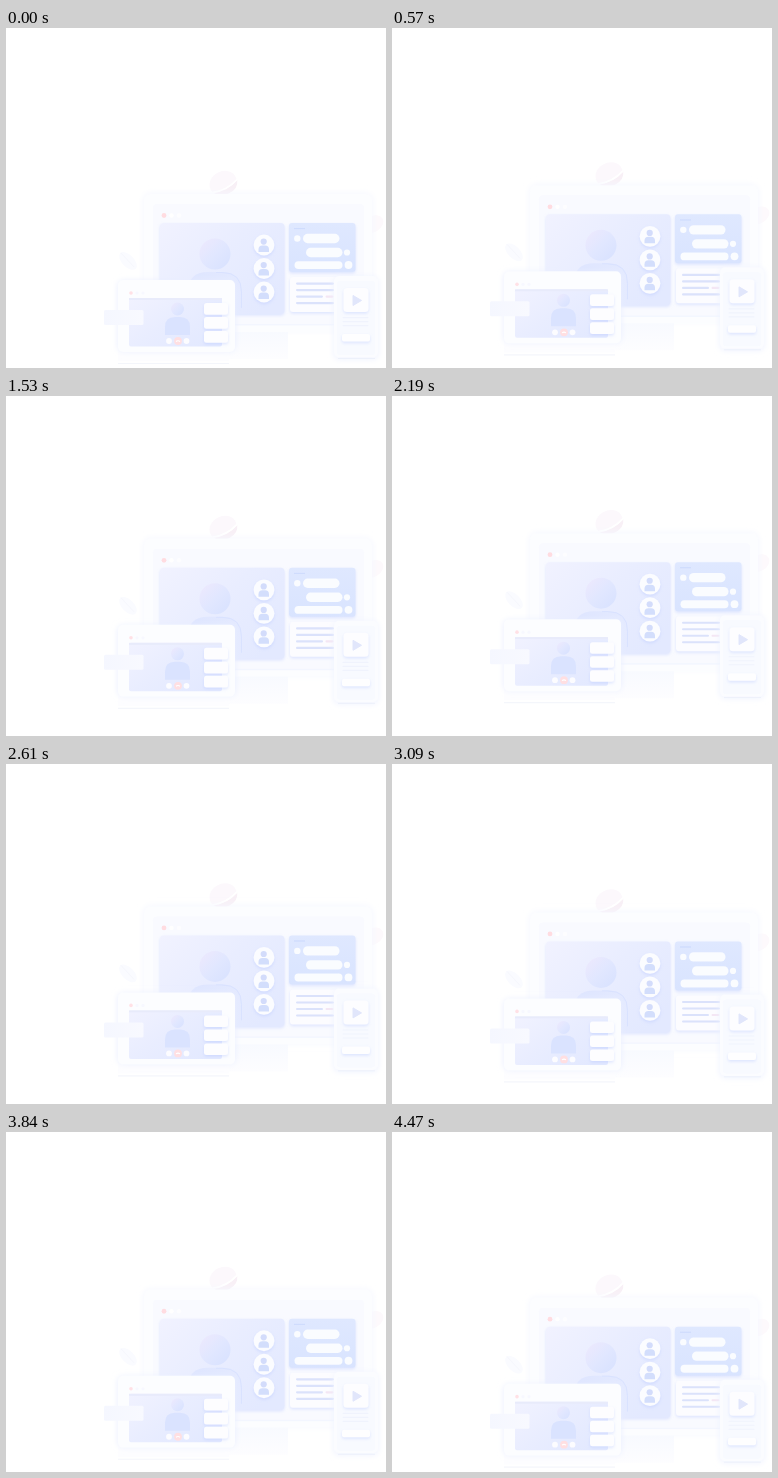
An HTML page for the animation above (4.5 s loop, 380 by 340 pixels).

```html
<!DOCTYPE html>
<html lang="en">
<head>
<meta charset="utf-8">
<title>Floating screens</title>
<style>
html, body { margin: 0; width: 100%; height: 100%; overflow: hidden; background: #fff; }
svg { display: block; width: 380px; height: 340px; }
</style>
</head>
<body>
<svg viewBox="0 0 380 340" xmlns="http://www.w3.org/2000/svg">
  <defs>
    <linearGradient id="call" x1="0" y1="0" x2="1" y2=".7">
      <stop offset="0" stop-color="#f1f2ff"/><stop offset=".5" stop-color="#e9edff"/><stop offset="1" stop-color="#e3e9ff"/>
    </linearGradient>
    <linearGradient id="chat" x1="0" y1="0" x2="0" y2="1">
      <stop offset="0" stop-color="#dfe8ff"/><stop offset="1" stop-color="#d9e4ff"/>
    </linearGradient>
    <linearGradient id="head" x1="0" y1="0" x2="1" y2="1">
      <stop offset="0" stop-color="#eee9fd"/><stop offset=".5" stop-color="#e1e7ff"/><stop offset="1" stop-color="#d7e1ff"/>
    </linearGradient>
    <linearGradient id="torso" x1="0" y1="0" x2="1" y2="0">
      <stop offset="0" stop-color="#dee5ff"/><stop offset="1" stop-color="#e4eaff"/>
    </linearGradient>
    <linearGradient id="tag" x1="0" y1="0" x2="1" y2="0">
      <stop offset="0" stop-color="#f5f7ff"/><stop offset="1" stop-color="#f8f9ff"/>
    </linearGradient>
    <linearGradient id="stand" x1="0" y1="0" x2="0" y2="1">
      <stop offset="0" stop-color="#f8faff"/><stop offset="1" stop-color="#fdfdff"/>
    </linearGradient>
    <filter id="soft" x="-30%" y="-30%" width="160%" height="160%"><feGaussianBlur stdDeviation="3"/></filter>
    <filter id="drop" x="-30%" y="-40%" width="160%" height="200%">
      <feDropShadow dx="0" dy="1.5" stdDeviation="1.5" flood-color="#aebfff" flood-opacity=".38"/>
    </filter>
  </defs>
  <g id="scene">
    <!-- loose shapes -->
    <g transform="rotate(-28 217 155)">
      <ellipse cx="217" cy="155" rx="14" ry="11.5" fill="#fcf8fc"/>
      <path d="M204 159q13 6 27 0q-3 8-13 8t-14-8z" fill="#f8f0f6"/>
      <path d="M203 158.500q14 5 28 0" fill="none" stroke="#fff" stroke-width="1.800"/>
    </g>
    <ellipse cx="122" cy="233" rx="11" ry="6" transform="rotate(45 122 233)" fill="#fafbff"/>
    <path d="M115 225l13 14" stroke="#f6f7fd" stroke-width="1"/>
    <ellipse cx="367" cy="196" rx="11" ry="8" transform="rotate(-30 367 196)" fill="#fdf9fc"/>

    <!-- monitor -->
    <rect x="137" y="165" width="230" height="138" rx="8" fill="#f6f8ff" filter="url(#soft)"/>
    <rect x="138" y="166" width="228" height="138" rx="6" fill="#fcfdff"/>
    <rect x="147" y="176" width="211" height="120" rx="4" fill="#f9faff"/>
    <rect x="147" y="296" width="211" height="1.500" fill="#f3f6ff"/>
    <path d="M223 304h59v27h-59z" fill="url(#stand)"/>
    <circle cx="158" cy="187.500" r="2.400" fill="#ffdce1"/>
    <circle cx="165.500" cy="187.500" r="2.200" fill="#fff"/>
    <circle cx="173" cy="187.500" r="2.200" fill="#fdfdff"/>

    <rect x="154" y="195" width="124.500" height="91" rx="4" fill="url(#call)" filter="url(#drop)"/>
    <path d="M182 286v-22q0-20 20-20h14q20 0 20 20v22z" fill="url(#torso)"/>
    <path d="M210 244.500h6q19.500 0 19.500 19.500v16" fill="none" stroke="#d9e2ff" stroke-width="1"/>
    <circle cx="209" cy="226" r="15.500" fill="url(#head)"/>
    <g id="contacts"></g>

    <rect x="283" y="195" width="66.500" height="49" rx="3" fill="url(#chat)" filter="url(#drop)"/>
    <rect x="288" y="200" width="11" height="1.200" fill="#cfdcfd"/>
    <g id="bubbles" fill="#fafcff"></g>

    <rect x="284" y="249" width="60" height="35" rx="3" fill="#fcfcff" filter="url(#drop)"/>
    <g id="notes"></g>

    <!-- phone -->
    <rect x="328" y="249" width="44" height="82" rx="5" fill="#eef2ff" filter="url(#soft)"/>
    <rect x="328" y="248" width="44" height="81.500" rx="5" fill="#fbfcff"/>
    <rect x="331" y="253" width="38" height="74" rx="3" fill="#f8faff"/>
    <rect x="337.500" y="260" width="25" height="24" rx="3.500" fill="#fdfdff" filter="url(#drop)"/>
    <path d="M347 267.500l8.500 5-8.500 5z" fill="#e1e6fb" stroke="#e1e6fb" stroke-linejoin="round"/>
    <g id="lines"></g>
    <rect x="336" y="306" width="28" height="7.500" rx="2" fill="#fefeff" filter="url(#drop)"/>
    <path d="M332 330.500h37" stroke="#edf1fb" stroke-width="1"/>

    <!-- small window -->
    <path d="M112 335.500h111" stroke="#f4f6fb" stroke-width="1.200"/>
    <rect x="112" y="320" width="111" height="13" fill="#fdfdff"/>
    <rect x="112" y="253" width="117" height="70" rx="5" fill="#e9eeff" filter="url(#soft)"/>
    <rect x="112" y="252" width="117" height="72" rx="5" fill="#fcfdff"/>
    <circle cx="125" cy="265" r="1.800" fill="#ffe1e6"/>
    <circle cx="131" cy="265" r="1.600" fill="#f7f8ff"/>
    <circle cx="137" cy="265" r="1.600" fill="#f7f8ff"/>
    <rect x="123" y="270" width="93" height="48.500" rx="2" fill="url(#call)"/>
    <rect x="123" y="270" width="93" height="2" fill="#e8ebfb"/>
    <path d="M159 307v-8q0-10 10-10h5q10 0 10 10v8z" fill="#dae3ff"/>
    <circle cx="171.500" cy="281" r="6.500" fill="url(#head)"/>
    <circle cx="163" cy="313" r="2.900" fill="#fcfcff"/>
    <circle cx="172" cy="313" r="3.900" fill="#ffdfe2"/>
    <path d="M170 313.500q2-1.500 4 0" fill="none" stroke="#fff" stroke-width="1.100"/>
    <circle cx="180.500" cy="313" r="2.900" fill="#fcfcff"/>
    <g id="cards"></g>
    <rect x="98" y="282" width="39.500" height="15" rx="1.500" fill="url(#tag)"/>
  </g>
</svg>
<script>
const $ = id => document.getElementById(id);
const pill = (x, y, w, h, attrs = '') =>
  `<rect x="${x}" y="${y}" width="${w}" height="${h}" rx="${h / 2}" ${attrs}/>`;
const dot = (x, y, r, attrs = '') => `<circle cx="${x}" cy="${y}" r="${r}" ${attrs}/>`;

$('contacts').innerHTML = [217, 240.5, 264].map(y =>
  dot(258, y, 10.4, 'fill="#fbfcff" filter="url(#drop)"') +
  `<path d="M252.500 ${y + 7}v-2.500q0-4 4-4h2.500q4 0 4 4v2.500z" fill="#d3defc"/>` +
  dot(257.700, y - 3.4, 3.1, 'fill="#d3dcfb"')).join('');

$('bubbles').innerHTML =
  dot(291.300, 210.5, 3.2) + pill(297, 205.8, 36.5, 9.4) +
  pill(300, 219.8, 36.5, 9.4) + dot(341, 224.5, 3.1) +
  pill(288.5, 233.2, 48, 7.8) + dot(342.500, 237, 3.9);

$('notes').innerHTML = [
  [290, 254.500, 38], [290, 261, 38], [290, 267.500, 27], [290, 274, 38]
].map(([x, y, w]) => pill(x, y, w, 2.2, 'fill="#dbe2fb"')).join('') +
  pill(319.5, 267.500, 8, 2.2, 'fill="#f4e6f4"');

$('lines').innerHTML = [289, 293, 297].map(y =>
  pill(336.5, y, 26, 1.2, 'fill="#f0f3fd"')).join('');

$('cards').innerHTML = [275, 289, 303].map(y =>
  `<rect x="198" y="${y}" width="24" height="11.700" rx="2.500" fill="#fdfdff" filter="url(#drop)"/>`).join('');

const LOOP = 4500, RISE = 1980, FALL = 2100, HEIGHT = 30;

// Steady rise, short rest, steady descent.
function lift(t) {
  if (t < RISE) return HEIGHT * t / RISE;
  if (t < FALL) return HEIGHT;
  return HEIGHT * (LOOP - t) / (LOOP - FALL);
}

function draw(now) {
  $('scene').setAttribute('transform', `translate(0 ${-lift(now % LOOP).toFixed(2)})`);
}

const start = performance.now();
function tick() {
  draw(performance.now() - start);
  requestAnimationFrame(tick);
}
tick();
</script>
</body>
</html>
```
